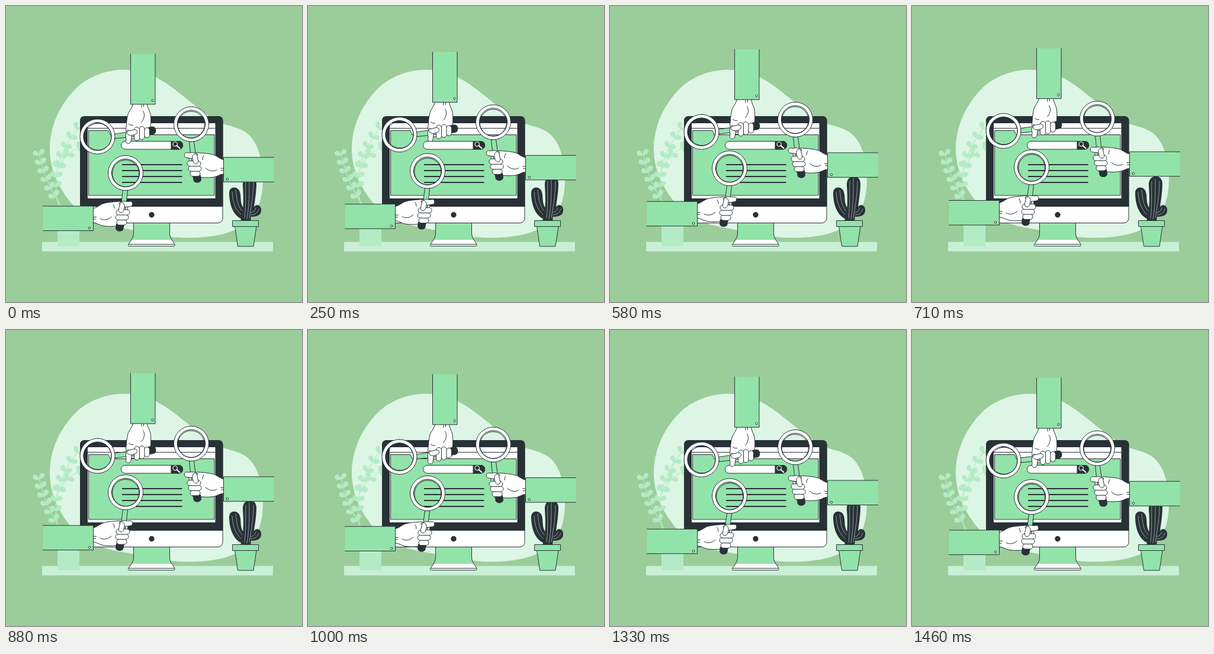
Animation, 500 px wide and 500 px high, one loop 1.5 s. Source, as an HTML page:

```html
<!DOCTYPE html>
<html lang="en">
<head>
<meta charset="utf-8">
<title>Search</title>
<style>
  html, body { margin: 0; width: 100%; height: 100%; overflow: hidden; background: #9acd99; }
  svg { display: block; width: 100%; height: 100%; }
  .ink { fill: #283236; }
  .green { fill: #92e3a9; }
  .white { fill: #fff; }
  .pale { fill: #b4ebc5; }
  .line { fill: none; }
  .line, .edge { stroke: #283236; stroke-width: 1; stroke-linejoin: round; stroke-linecap: round; }
  .rib { fill: none; stroke: #fff; stroke-width: .5; stroke-linecap: round; }
</style>
</head>
<body>
<svg viewBox="0 0 500 500">
  <path fill="#ddf5e5" d="M74 238C75 197 96 158 125 133C152 112 190 101 232 112C266 122 292 147 318 167C337 182 350 193 367 199C380 203 393 206 403 212C426 226 434 262 434 292C434 330 423 357 395 374C365 391 320 394 280 390C250 386 225 380 190 374C152 367 121 349 104 325C84 298 73 268 74 238Z"/>
  <rect x="61" y="398.500" width="390" height="16" fill="#c8f0d4"/>
  <g id="plant"></g>
  <path class="pale" d="M87 350H124V406H87Z"/>

  <g id="monitor">
    <path class="green" d="M216 366H277V384Q277 391 281 396H212Q216 391 216 384Z"/>
    <path class="white" d="M212.500 395H280.500L285 402.500H207Z"/>
    <path class="line" d="M215.500 367V384C215.500 393 209 398 207 402.500M276.500 367V384C276.500 393 283 398 285 402.500"/>
    <rect class="white edge" x="206.500" y="402.500" width="78.500" height="3" rx="1"/>
    <rect class="white edge" x="125.500" y="186.500" width="240.500" height="180" rx="8"/>
    <path class="ink" d="M125 339V194Q125 186 133 186H358.500Q366.500 186 366.500 194V339Z"/>
    <rect class="white" x="138" y="198" width="215.500" height="127"/>
    <path class="line" d="M138.500 206.500H353"/>
    <path class="green edge" d="M139.500 319.500V210.500H173L176 217.500H352V319.500Z"/>
    <circle class="ink" cx="246" cy="352.700" r="4.700"/>
    <rect class="white edge" x="194.500" y="228.500" width="104" height="13.500" rx="6.750"/>
    <path class="ink" d="M278.500 228H292A7.200 7.200 0 0 1 292 242.500H278.500Z"/>
    <g fill="none" stroke="#fff" stroke-width="1.200" stroke-linecap="round">
      <circle cx="285.700" cy="233.200" r="3.700"/>
      <path d="M288.500 236L293.500 240.300" stroke-width="2"/>
    </g>
    <path class="line" style="stroke-width:1.800;stroke-linecap:butt" d="M196 268H297.500M196 278H297.500M196 288H297.500M196 298H297.500"/>
  </g>

  <g id="cactus">
    <path class="ink" d="M396 363C401 347 402 330 400 303C399 283 423 283 423 300C423 315 420 330 419 340C421 334 430 335 431 343C432 354 423 356 414 356L413 363Z"/>
    <path class="ink" d="M377 318C376 303 392 304 395 314C398 323 394 334 403 344L402 361C389 358 378 344 377 318Z"/>
    <path class="rib" d="M405 296C404 317 406 334 403 358M411 292C411 316 411 337 407 360M418 296C418 315 415 335 411 358M382 314C383 331 387 344 397 352M388 311C390 325 390 337 399 346M414 353Q424 353 427 343M414 349Q420 348 422 341"/>
    <path class="green edge" d="M387 372.500H423L418 406H392Z"/>
    <rect class="green edge" x="383" y="362.500" width="43.500" height="10"/>
  </g>

  <defs>
    <g id="arm">
      <path class="white edge" d="M147 342C153 341 157 337 163 334C172 331 183 331 192 330L206 336L205 352L196 369C190 372.500 174 373 164 371.500C157 370 153 366 147 366Z"/>
      <path class="line" d="M148 356.500H152.500M148 360H151.500M159 359C164 363 173 361 178 356M181 335Q183.500 338 183 342"/>
      <path class="green edge" d="M198 310.500L205.500 311.500L199 372L190 371Z"/>
      <path class="ink" d="M186 368L199.500 369L198.500 376.500C197 383 185 382 185 375Z"/>
      <g class="white edge">
        <path d="M191 333C195 328.500 202 330 206 330.500L210 330C215 330 215 338.500 210 338.500L200 340Z"/>
        <rect x="187" y="361" width="17" height="9" rx="4.500"/>
        <rect x="185" y="352.500" width="22" height="9" rx="4.500"/>
        <rect x="186" y="344" width="23" height="9" rx="4.500"/>
        <path d="M193 333C197 329 201 335 200 340C199 345 198 349 194 349C190 349 190 345 191 341Z"/>
      </g>
      <path class="green" d="M62.500 338H147.500V379.500H62.500Z"/>
      <path class="line" d="M62.500 338H147.500V379.500H62.500"/>
      <circle class="white edge" cx="141" cy="375" r="1.800"/>
      <path class="white edge" fill-rule="evenodd" d="M172.500 282a29.500 29.500 0 1 0 59 0a29.500 29.500 0 1 0-59 0ZM178.300 282a23.700 23.700 0 1 0 47.400 0a23.700 23.700 0 1 0-47.400 0Z"/>
      <circle class="line" cx="202.300" cy="282.800" r="22.600"/>
    </g>
  </defs>
  <g id="arms">
    <use href="#arm"/>
    <use href="#arm" transform="matrix(-1 0 0 1 515 -82.300)"/>
    <use href="#arm" transform="matrix(0 1 1 0 -127.500 18.500)"/>
  </g>
</svg>
<script>
const LOOP = 1500, FRAMES = 36, LIFT = 9.8;
const arms = document.getElementById('arms');

// Stem as a quadratic curve with paired leaves along it.
function stem(a, b, c, pairs) {
  const at = u => [0, 1].map(i => (1 - u) ** 2 * a[i] + 2 * u * (1 - u) * b[i] + u * u * c[i]);
  let svg = `<path d="M${a}Q${b} ${c}" fill="none" stroke="#b4ebc5" stroke-width="1.3"/>`;
  for (let i = 0; i < pairs; i++) {
    const u = 0.25 + 0.73 * i / (pairs - 1);
    const [x, y] = at(u), [px, py] = at(u - 0.02);
    const angle = Math.atan2(y - py, x - px) * 180 / Math.PI;
    for (const side of [-50, 50])
      svg += `<path class="pale" transform="translate(${x} ${y}) rotate(${angle + side})" d="M0 0C4-6 12-6 12 0C12 5 5 5 0 0Z"/>`;
  }
  return svg;
}
document.getElementById('plant').innerHTML =
  stem([98, 345], [66, 300], [56, 250], 6) +
  stem([90, 340], [70, 270], [122, 205], 7) +
  stem([82, 290], [95, 250], [122, 240], 3);

function draw(now) {
  const step = Math.floor((now % LOOP + 5) / (LOOP / FRAMES)) % FRAMES;
  const rise = 1 - Math.abs(1 - step / 17.5);
  arms.setAttribute('transform', `translate(0 ${-LIFT * rise})`);
  requestAnimationFrame(() => draw(performance.now() - start));
}
const start = performance.now();
draw(0);
</script>
</body>
</html>
```
